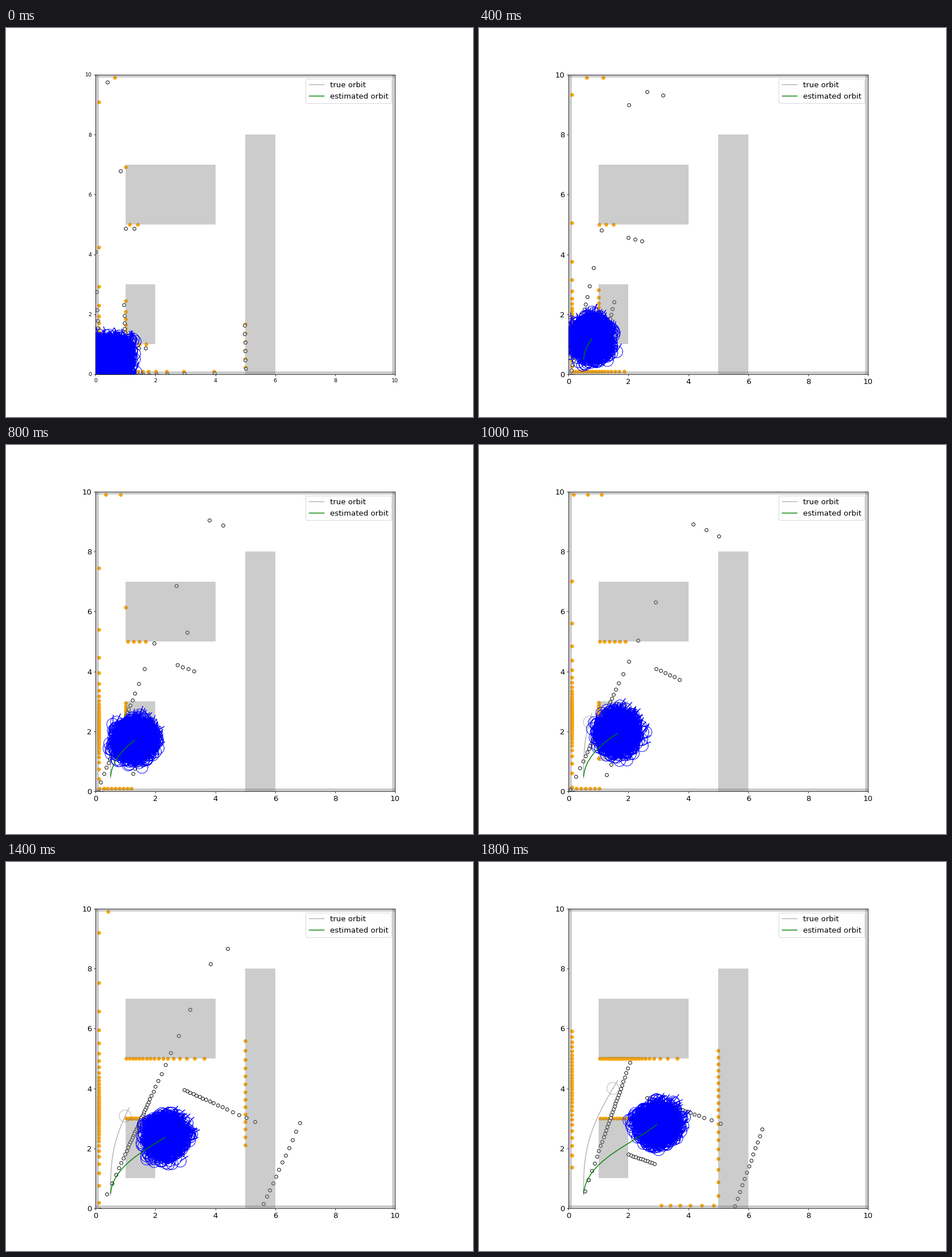
These frames come from a looping animation (820 by 683 pixels, 1.9 s). A matplotlib script:

```python
import numpy as np
import matplotlib.pyplot as plt
from matplotlib.animation import FuncAnimation
from matplotlib.patches import Circle, Rectangle

W, H = 820, 683
DPI = W / 12
FRAMES = 19
PARTICLES = 1000
RADIUS, NOSE = 0.2, 0.3
SPREAD = 1.15

# Walls and obstacles: x, y, width, height
BOXES = [(0, 0, 10, 0.1), (0, 9.9, 10, 0.1), (0, 0, 0.1, 10), (9.9, 0, 0.1, 10),
         (1, 1, 1, 2), (1, 5, 3, 2), (5, 0, 1, 8)]

BEAMS = np.linspace(-np.pi, np.pi, 100)
steps = np.arange(FRAMES + 1)


def curve(*values):
    """Cubic through four values spread evenly over the loop."""
    return np.polyval(np.polyfit(np.linspace(0, FRAMES - 1, 4), values, 3), steps)


def unit(angle):
    return np.column_stack([np.cos(angle), np.sin(angle)])


true_path = np.column_stack([curve(0.5, 0.55, 0.82, 1.48), curve(0.44, 1.6, 2.68, 4.0)])
true_dir = np.radians(curve(90.9, 84, 69.6, 58.4))
est_path = np.column_stack([curve(0.5, 1.0, 1.97, 2.95), curve(0.5, 1.44, 2.15, 2.8)])
# The estimate turns steadily, then runs almost straight.
est_dir = np.radians(92.5 - 4.25 * np.minimum(steps, 12) - 0.4 * np.maximum(steps - 12, 0))


def scan(pos, heading):
    """Distance to the nearest box along every beam."""
    ray = unit(heading + BEAMS)
    best = np.full(len(BEAMS), 20.0)
    for x, y, w, h in BOXES:
        t1 = (np.array([x, y]) - pos) / ray
        t2 = (np.array([x + w, y + h]) - pos) / ray
        enter = np.minimum(t1, t2).max(axis=1)
        leave = np.maximum(t1, t2).min(axis=1)
        hit = (enter > 0) & (enter <= leave)
        best = np.where(hit, np.minimum(best, enter), best)
    return best[:, None]


def particles(i):
    """Cloud that starts as a square block and settles into a round one."""
    rng = np.random.default_rng(100 + i)
    settled = min(i / 3, 1)
    block = rng.uniform(-0.62, 0.62, (PARTICLES, 2)) + rng.normal(0, 0.1, (PARTICLES, 2))
    reach = SPREAD * np.sqrt(rng.beta(1, 6, PARTICLES))
    cloud = reach[:, None] * unit(rng.uniform(0, 2 * np.pi, PARTICLES))
    pos = est_path[i] + (1 - settled) * block + settled * cloud
    return pos, est_dir[i] + rng.normal(0, 0.25, PARTICLES)


def broken_line(points):
    """Join (n, k, 2) strokes into one line with gaps."""
    gap = np.full((len(points), 1, 2), np.nan)
    return np.concatenate([points, gap], axis=1).reshape(-1, 2).T


def noses_of(pos, heading):
    return broken_line(np.stack([pos, pos + NOSE * unit(heading)], axis=1))


fig, ax = plt.subplots(figsize=(W / DPI, H / DPI), dpi=DPI)
ax.set_aspect("equal")
ax.set_xlim(0, 10)
ax.set_ylim(0, 10)

for x, y, w, h in BOXES:
    ax.add_patch(Rectangle((x, y), w, h, fc="gray", ec="none", alpha=0.4, zorder=1.2))


def line(color, z, **style):
    return ax.plot([], [], color=color, zorder=z, **style)[0]


hits = ax.scatter([], [], s=36, color="orange", zorder=1)
seen = ax.scatter([], [], s=36, fc="white", ec="black", lw=1, zorder=1.1)
robot = ax.add_patch(Circle((0, 0), RADIUS, fill=False, ec="gray", alpha=0.6, zorder=1.3))
robot_nose = line("gray", 1.3, alpha=0.6)
true_line = line("gray", 1.4, alpha=0.6, label="true orbit")
rings = line("blue", 1.5, lw=1)
noses = line("blue", 2)
est_line = line("green", 3, label="estimated orbit")
ax.legend(handles=[true_line, est_line], loc="upper right", fontsize=14)

ring = RADIUS * unit(np.linspace(0, 2 * np.pi, 29))


def update(i):
    ax.tick_params(labelsize=10 if i == 0 else 14)

    # The scan is taken after the next move, before the pose is redrawn.
    sensor = true_path[i + 1]
    dist = scan(sensor, true_dir[i])
    hits.set_offsets(sensor + dist * unit(true_dir[i] + BEAMS))
    seen.set_offsets(est_path[i] + dist * unit(est_dir[i] + BEAMS))

    pos, heading = particles(i)
    rings.set_data(*broken_line(pos[:, None] + ring))
    noses.set_data(*noses_of(pos, heading))

    robot.center = true_path[i]
    robot_nose.set_data(*noses_of(true_path[i:i + 1], true_dir[i:i + 1]))
    true_line.set_data(*true_path[:i + 1].T)
    est_line.set_data(*est_path[:i + 1].T)
    return hits, seen, robot, robot_nose, true_line, rings, noses, est_line


anim = FuncAnimation(fig, update, frames=FRAMES, interval=100, repeat=True, repeat_delay=0)
plt.show()
```
